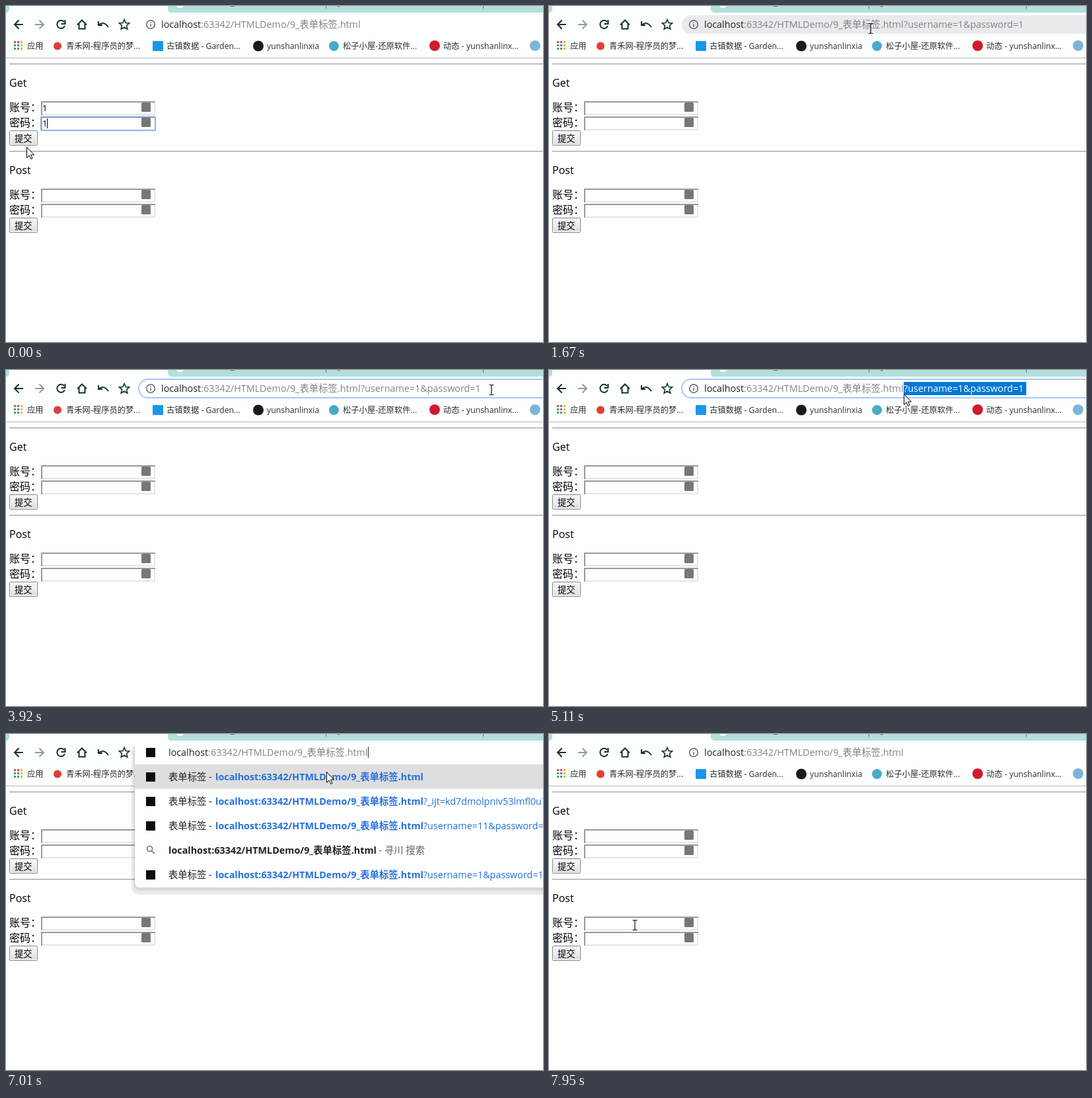
An HTML page for the animation above (8 s loop, 813 px wide and 508 px high).

```html
<!DOCTYPE html>
<html lang="zh-CN">
<head>
<meta charset="utf-8">
<title>表单标签</title>
<style>
html, body { margin: 0; width: 100%; height: 100%; overflow: hidden; background: #fdfefe; }
body > svg { position: absolute; left: 0; top: 0; width: 813px; height: 508px; }
text { font-family: "Open Sans", "Noto Sans CJK SC", "Noto Sans CJK", sans-serif; white-space: pre; }
.page { font-size: 16px; }
.small { font-size: 13.33px; }
.bookmarks { font-size: 12.3px; fill: #26302f; }
.bar { font-size: 14.35px; }
.dark { fill: #202124; }
.grey { fill: #808488; }
.link { fill: #2470e0; }
.strong { font-weight: 700; }
.line { fill: none; stroke: #12302f; stroke-width: 2; }

/* One 8 s clock with hard changes for every part */
.clock { animation: 8s step-end infinite; }
.filled { animation-name: filled; }
.caret { animation-name: caret; }
.hover { animation-name: hover; }
.press { animation-name: press; }
.query { animation-name: query; }
.icons { animation-name: icons; }
.pill-hover { animation-name: pill-hover; }
.pill-focus { animation-name: pill-focus; }
.menu { animation-name: menu; }
.ghost { animation-name: ghost; }
.row-hover { animation-name: row-hover; }
.selection { animation-name: selection; }
.pointer { animation-name: move; }
.arrow { animation-name: arrow; }
.beam { animation-name: beam; }

@keyframes filled { 0% { opacity: 1 } 10.25%, 100% { opacity: 0 } }
@keyframes caret { 0% { opacity: 1 } 3.25%, 100% { opacity: 0 } }
@keyframes hover { 0% { opacity: 0 } 1.5% { opacity: 1 } 8.375%, 100% { opacity: 0 } }
@keyframes press { 0% { opacity: 0 } 8.375% { opacity: 1 } 10.25%, 100% { opacity: 0 } }
@keyframes query { 0% { opacity: 0 } 10.25% { opacity: 1 } 74.24%, 100% { opacity: 0 } }
@keyframes icons { 0% { opacity: 1 } 10.25% { opacity: 0 } 17.5% { opacity: 1 } 89.12% { opacity: 0 } 95.75%, 100% { opacity: 1 } }
@keyframes pill-hover { 0% { opacity: 0 } 19.12% { opacity: 1 } 28.75%, 100% { opacity: 0 } }
@keyframes pill-focus { 0% { opacity: 0 } 28.75% { opacity: 1 } 74.24%, 100% { opacity: 0 } }
@keyframes menu { 0% { opacity: 0 } 74.24% { opacity: 1 } 89.12%, 100% { opacity: 0 } }
@keyframes ghost { 0% { opacity: .12 } 75.75%, 100% { opacity: 0 } }
@keyframes row-hover { 0% { opacity: 0 } 82.5% { opacity: 1 } 89.12%, 100% { opacity: 0 } }
@keyframes arrow { 0% { opacity: 1 } 19.12% { opacity: 0 } 63.87% { opacity: 1 } 97.5%, 100% { opacity: 0 } }
@keyframes beam { 0% { opacity: 0 } 19.12% { opacity: 1 } 63.87% { opacity: 0 } 97.5%, 100% { opacity: 1 } }

/* Dragged rightwards from 520, then leftwards from 722.5 */
@keyframes selection {
  0% { clip-path: inset(18px 293px 470px 520px) }
  30.25% { clip-path: inset(18px 268px 470px 520px) }
  32% { clip-path: inset(18px 213px 470px 520px) }
  34% { clip-path: inset(18px 158px 470px 520px) }
  35.87% { clip-path: inset(18px 118px 470px 520px) }
  37.75% { clip-path: inset(18px 104px 470px 520px) }
  39.25% { clip-path: inset(18px 99px 470px 520px) }
  40.75% { clip-path: inset(18px 90.5px 470px 520px) }
  45.75% { clip-path: inset(18px 90.5px 470px 722.5px) }
  49.12% { clip-path: inset(18px 90.5px 470px 682px) }
  50.75% { clip-path: inset(18px 90.5px 470px 618px) }
  52.37% { clip-path: inset(18px 90.5px 470px 567px) }
  54% { clip-path: inset(18px 90.5px 470px 543.5px) }
  58.87% { clip-path: inset(18px 90.5px 470px 537px) }
  74.24%, 100% { clip-path: inset(18px 90.5px 470px 722.5px) }
}

@keyframes move {
  0% { transform: translate(31px, 213px) }
  1.5% { transform: translate(31px, 208px) }
  3.25% { transform: translate(29px, 201px) }
  4.87% { transform: translate(28px, 196px) }
  15.75% { transform: translate(100px, 160px) }
  17.5% { transform: translate(260px, 90px) }
  19.12% { transform: translate(400px, 42px) }
  20.87% { transform: translate(487px, 34px) }
  23.87% { transform: translate(505px, 30px) }
  25.62% { transform: translate(515px, 27px) }
  27.25% { transform: translate(520px, 26px) }
  30.25% { transform: translate(547px, 25px) }
  32% { transform: translate(603px, 24px) }
  34% { transform: translate(660px, 23px) }
  35.87% { transform: translate(703px, 22px) }
  37.75% { transform: translate(711px, 23px) }
  39.25% { transform: translate(718px, 25px) }
  40.75% { transform: translate(727px, 27px) }
  42.25% { transform: translate(732px, 28px) }
  44.12% { transform: translate(755px, 28px) }
  45.75% { transform: translate(765px, 28px) }
  47.37% { transform: translate(735px, 30px) }
  49.12% { transform: translate(682px, 32px) }
  50.75% { transform: translate(618px, 35px) }
  52.37% { transform: translate(567px, 38px) }
  54% { transform: translate(546px, 40px) }
  55.75% { transform: translate(543px, 41px) }
  58.87% { transform: translate(541px, 40px) }
  60.37% { transform: translate(540px, 37px) }
  63.87% { transform: translate(537px, 36px) }
  80.75% { transform: translate(534px, 43px) }
  82.5% { transform: translate(525px, 50px) }
  84.25% { transform: translate(510px, 54px) }
  85.87% { transform: translate(496px, 56px) }
  87.62% { transform: translate(485px, 57px) }
  89.12% { transform: translate(430px, 58px) }
  92.5% { transform: translate(330px, 59px) }
  95.75% { transform: translate(240px, 150px) }
  97.5% { transform: translate(101px, 308px) }
  99.37%, 100% { transform: translate(130px, 289px) }
}
</style>
</head>
<body>
<svg viewBox="0 0 813 508">
  <defs>
    <linearGradient id="face" x2="0" y2="1">
      <stop offset="0" stop-color="#f5f5f5"/><stop offset=".5" stop-color="#ededed"/><stop offset="1" stop-color="#dadada"/>
    </linearGradient>
    <g id="field">
      <rect width="173" height="21" fill="#fefefe"/>
      <path d="M2 20H172V1" fill="none" stroke="#e6e6e6" stroke-width="2"/>
      <path d="M1 21V1H173" fill="none" stroke="#9a9a9a" stroke-width="2"/>
    </g>
    <g id="button">
      <rect x=".5" y=".5" width="42" height="22" rx="1" fill="url(#face)" stroke="#858585"/>
      <rect x="1.5" y="1.5" width="40" height="20" fill="none" stroke="#f8f8f8"/>
      <text class="small" x="8" y="16.5">提交</text>
    </g>
    <rect id="badge" width="14" height="14" rx="1.5" fill="#777"/>
    <g id="form">
      <path d="M5 .5H813" stroke="#999"/>
      <path d="M5 1.5H813" stroke="#ececec"/>
      <text class="page" x="5" y="71.5">账号：</text>
      <text class="page" x="5" y="94.5">密码：</text>
      <use href="#field" x="53" y="57"/>
      <use href="#field" x="53" y="80"/>
      <use href="#button" x="5" y="101"/>
    </g>
    <rect id="site" x="212" width="14" height="14" fill="#0c0c0c"/>
  </defs>

  <!-- Tab strip -->
  <path d="M0 0H5V4Q5 10 0 10ZM245 0H813V10H251Q245 10 245 4Z" fill="#b2dfdb"/>
  <path d="M258 0a6 5 0 0 0 11 0Z" fill="#fff"/>
  <path d="M340 .5H346M484.5 0V4M722.5 0V4" stroke="#51706d" fill="none"/>
  <path d="M501 0h5l-2 2Z" fill="#d9534f"/>

  <!-- Toolbar -->
  <g class="line">
    <path d="M26 28H13M19.5 21.5 13 28 19.5 34.5"/>
    <path d="M44 28H57M50.5 21.5 57 28 50.5 34.5" stroke="#8f9c9c"/>
    <path d="M88 24A6 6 0 1 0 89 30M89.5 21V27H83.5"/>
    <path d="M108 28.5 115 21.5 122 28.5M110.5 27V34.5H119.5V27"/>
    <path d="M140 23V29H146M140.5 28.5Q148 22 155 32"/>
    <path d="M179 20.5 181.2 25.5 186.6 26 182.5 29.6 183.8 35 179 32.1 174.2 35 175.5 29.6 171.4 26 176.8 25.5Z" stroke-width="1.6"/>
  </g>
  <rect class="clock pill-hover" x="201" y="14" width="640" height="28" rx="14" fill="#e8eaed"/>
  <rect class="clock pill-focus" x="201" y="14" width="640" height="28" rx="14" fill="#fff" stroke="#a9c8f7" stroke-width="2"/>
  <g fill="none" stroke="#5f6368" stroke-width="1.5">
    <circle cx="219" cy="28" r="6.3"/>
    <path d="M219 27V31.5M219 24.3V25.8"/>
  </g>
  <g class="bar grey">
    <text id="address" x="235" y="33"><tspan class="dark">localhost</tspan>:63342/HTMLDemo/9_表单标签.html</text>
    <g class="clock query"><text id="params" x="537" y="33">?username=1&amp;password=1</text></g>
  </g>

  <!-- Bookmarks -->
  <g id="bookmarks">
    <g fill="none" stroke-width="3" stroke-dasharray="3 2">
      <path d="M12 54.5H25" stroke="#e5473a"/>
      <path d="M12 59.5H25" stroke="#3f83e8"/>
      <path d="M12 64.5H25" stroke="#39a35a"/>
      <path d="M22 54.5H25M22 59.5H25M22 64.5H25" stroke="#efb52c"/>
      <path d="M12 59.5H15" stroke="#39a35a"/>
    </g>
    <circle cx="78" cy="60.5" r="6" fill="#e33d36"/>
    <rect x="222" y="53" width="16" height="15" rx="1" fill="#1798ec"/>
    <circle cx="382" cy="60.5" r="8" fill="#181b1c"/>
    <circle cx="496.5" cy="60.5" r="7.5" fill="#45aacb"/>
    <circle cx="649" cy="60" r="8" fill="#cf1b30"/>
    <circle cx="801" cy="60" r="8" fill="#7db4dc"/>
    <g class="bookmarks">
      <text x="32" y="65">应用</text>
      <text x="91" y="65">青禾网-程序员的梦...</text>
      <text x="243" y="65">古镇数据 - Garden...</text>
      <text x="395" y="65">yunshanlinxia</text>
      <text x="510" y="65">松子小屋-还原软件...</text>
      <text x="662" y="65">动态 - yunshanlinx...</text>
    </g>
  </g>
  <path d="M0 78.5H813" stroke="#b4b9b9"/>

  <!-- Page -->
  <use href="#form" y="87"/>
  <use href="#form" y="219"/>
  <text class="page" x="5" y="122">Get</text>
  <text class="page" x="5" y="254">Post</text>
  <g class="clock filled">
    <rect x="53" y="167.5" width="173" height="20.5" rx="1" fill="#fff" stroke="#8fb2ee" stroke-width="2"/>
    <path d="M54 187V168.5H225" fill="none" stroke="#7184ad"/>
    <text class="small" x="55" y="159">1</text>
    <text class="small" x="55" y="182">1</text>
  </g>
  <path class="clock caret" d="M62.5 170V185" stroke="#000"/>
  <g class="clock icons">
    <use href="#badge" x="205" y="146"/>
    <use href="#badge" x="205" y="169"/>
    <use href="#badge" x="205" y="278"/>
    <use href="#badge" x="205" y="301"/>
  </g>
  <rect class="clock hover" x="6" y="189" width="41" height="21" fill="#fff" fill-opacity=".35"/>
  <rect class="clock press" x="6" y="189" width="41" height="21" fill="#000" fill-opacity=".1"/>

  <!-- Suggestions -->
  <g class="clock menu">
    <rect x="190" y="14" width="660" height="229" rx="12" fill-opacity=".08"/>
    <rect x="193" y="14" width="660" height="223" rx="10" fill-opacity=".08"/>
    <rect x="195" y="10" width="660" height="222" rx="8" fill="#fdfefe"/>
    <svg x="195" y="46" width="618" height="34" viewBox="195 46 618 34">
      <g class="clock ghost"><use href="#bookmarks"/></g>
    </svg>
    <rect class="clock row-hover" x="195" y="46" width="618" height="37" fill="#dedede"/>
    <use href="#site" y="21"/>
    <use href="#site" y="58"/>
    <use href="#site" y="95"/>
    <use href="#site" y="132"/>
    <use href="#site" y="206"/>
    <g fill="none" stroke="#6b7074" stroke-width="1.6">
      <circle cx="217.5" cy="173.5" r="4"/>
      <path d="M220.5 176.5 225 181"/>
    </g>
    <g class="bar">
      <use class="grey" href="#address" x="11"/>
      <path d="M548.5 19V36" stroke="#333"/>
      <g class="dark">
        <text id="label" x="246" y="70">表单标签 - </text>
        <use href="#label" y="37"/>
        <use href="#label" y="74"/>
        <use href="#label" y="148"/>
        <text x="246" y="181"><tspan class="strong">localhost:63342/HTMLDemo/9_表单标签.html</tspan><tspan fill="#5f6368"> - 寻川 搜索</tspan></text>
      </g>
      <g class="link">
        <text x="317" y="70" class="strong">localhost:63342/HTMLDemo/9_表单标签.html</text>
        <text x="317" y="107"><tspan class="strong">localhost:63342/HTMLDemo/9_表单标签.html</tspan>?_ijt=kd7dmolpniv53lmfl0u7</text>
        <text x="317" y="144"><tspan class="strong">localhost:63342/HTMLDemo/9_表单标签.html</tspan>?username=11&amp;password=11</text>
        <text x="317" y="218"><tspan class="strong">localhost:63342/HTMLDemo/9_表单标签.html</tspan>?username=1&amp;password=1</text>
      </g>
    </g>
  </g>
</svg>

<svg class="clock selection" viewBox="0 0 813 508">
  <rect width="813" height="508" fill="#0078d7"/>
  <g class="bar" fill="#fff">
    <use href="#address"/>
    <use href="#params"/>
  </g>
</svg>

<svg viewBox="0 0 813 508">
  <g class="clock pointer">
    <path class="clock arrow" d="M.5 .5V16.5L4.2 13 6.6 18.5 9 17.5 6.7 12H11.5Z" fill="#fff" stroke="#000"/>
    <path class="clock beam" d="M-3.5-7.5H-1L0-6.5 1-7.5H3.5M0-6.5V6.5M-3.5 7.5H-1L0 6.5 1 7.5H3.5" fill="none" stroke="#111" stroke-width="1.2"/>
  </g>
</svg>
</body>
</html>
```
